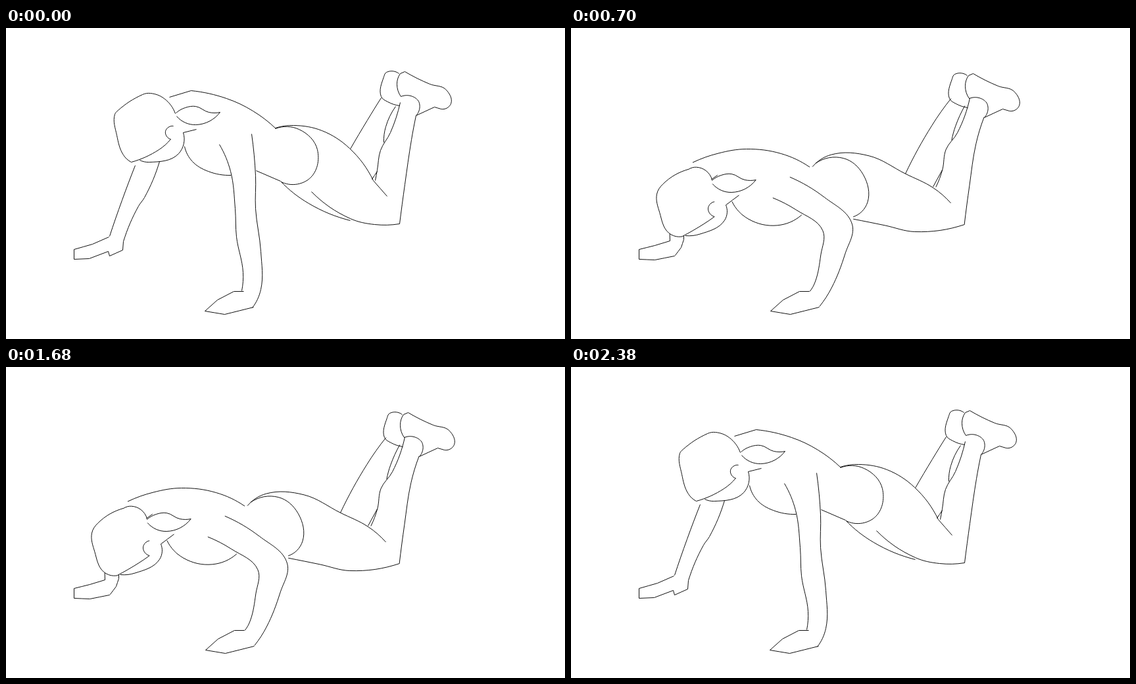
Recreate the animation shown at these times as an HTML page with a canvas. Size 850 by 474 pixels, loop 2520 ms.

```html
<!DOCTYPE html>
<html lang="en">
<head>
<meta charset="utf-8">
<title>Knee push-up</title>
<style>
html, body { margin: 0; width: 100%; height: 100%; overflow: hidden; background: #fff; }
canvas { display: block; }
</style>
</head>
<body>
<canvas id="stage" width="850" height="474"></canvas>
<script>
const ctx = document.getElementById('stage').getContext('2d');
const STEP = 140, STEPS = 18;
const NUM = /[\d.]+/g;
// Depth of the push-up at each named pose.
const AT = { up: 0, lift: 1, mid: 2, bend: 3, low: 4, late: 5, dip: 6, floor: 7 };

function shift(path, dx, dy) {
  let i = 0;
  return path.replace(NUM, n => +n + (i++ % 2 ? dy : dx));
}

function mix(a, b, t) {
  const to = b.match(NUM);
  let i = 0;
  return a.replace(NUM, n => (+n + (to[i++] - n) * t).toFixed(2));
}

// A part maps poses to a path: "x y x y", smooth except at "/" corners.
const slide = (path, moves) =>
  Object.fromEntries(Object.entries(moves).map(([k, [dx, dy]]) => [k, shift(path, dx, dy)]));
const keepLate = part => ({ ...part, late: part.low });
const fromDip = path => ({ dip: shift(path, 4, -16), floor: path });

const feet = path => slide(path, {
  up: [0, 0], lift: [1, -2], mid: [4, 2], bend: [4, 3], low: [4, 3], late: [5, 3], floor: [5, 3]
});

const farArmOuter = keepLate({
  up: '196 209 176 262 157 317',
  mid: '165 215 160 267 155 319',
  low: '147 273 149 298 150 324'
});
const farArmInner = keepLate({
  up: '233 203 210 258 201 271 178 325',
  mid: '197 230 191 262 187 272 177 319',
  low: '174 290 171 305 171 313 171 322'
});
const farHandUp = '156 318/131 329/103 337/103 352/126 351/155 340/157 347/177 338/178 325';
const farHand = keepLate({
  up: farHandUp,
  mid: farHandUp,
  low: '150 324/127 331/103 337/103 352/127 353/157 347/158 346/167 334/171 322'
});

const head = {
  up: '257 130 240 107 219 99 207 101/170 125 165 131 168 163 178 193 190 204/232 185 250 169/242 157 254 149',
  low: '220 205 211 190 197 184 187 187/143 211 138 218 142 250 152 282 165 291/206 272 223 261/214 248 223 237',
  floor: '202 282 192 271 176 267 162 270 132 290 114 322 119 343 140 371 175 370/190 352 207 339/196 328 207 319'
};
const jaw = {
  up: '203 201 217 204 262 191 269 159/289 154',
  low: '173 289 197 288 237 270 240 245/260 230',
  floor: '174 370 192 365 225 338 225 318/245 303'
};
const ponytail = slide('258 129 272 121 288 119 308 128 325 128/288 147 259 134', {
  up: [0, 0], mid: [-9, 28], low: [-38, 77], floor: [-57, 155]
});
const hairTie = { low: '219 205/229 199', floor: '200 282/209 273' };

const backFloor = '205 228 237 225 266 221 312 226 347 241';
const back = {
  up: '248 105/281 95/335 107 375 126 410 153',
  mid: '228 130/267 118/325 128 366 146 398 171',
  low: '160 197 206 172 262 163 322 172 374 198',
  ...fromDip(backFloor)
};
const elbow = fromDip('142 287 129 237 145 207 175 213 205 228');
const crook = fromDip('147 242 172 259 208 274');
const crease = fromDip('166 254/165 269');
const armpit = fromDip('347 315/361 313');
const chest = {
  up: '271 180 283 203 307 218 342 224',
  mid: '257 197 282 228 317 243 351 239',
  low: '247 243 270 271 315 282 352 269',
  floor: '239 306 268 330 310 337 347 315'
};

const armInner = {
  up: '324 177 341 218 348 275 350 318 360 372 358 400',
  mid: '324 177 350 235 370 287 371 340 367 385 362 401',
  low: '324 244 350 266 382 303 379 345 370 388 362 401',
  floor: '271 287 327 299 383 319/380 346 372 384 364 401'
};
const armOuter = {
  up: '373 161 379 225 379 275 387 340 387 398 374 426',
  mid: '362 170 395 243 409 290 402 352 392 400 377 424',
  low: '346 211 390 251 425 295 416 342 395 396 377 424',
  floor: '305 258 375 271 431 306 417 347 397 395 378 424'
};
const hand = slide('361 401/346 401/321 414/302 431/332 436/376 425', {
  up: [0, 0], low: [0, 0], late: [1, 0], floor: [1, 0]
});

const hip = {
  up: '409 153 445 154 473 185 461 229 418 234',
  low: '375 195 418 187 448 211 454 254 428 277',
  floor: '365 227 405 220 435 246 443 288 430 308'
};
const thigh = {
  up: '409 152 437 148 480 156 522 183 558 232/579 256',
  low: '374 196 400 183 455 185 512 216 553 242 578 266',
  floor: '352 241 385 212 448 213/500 233 546 246 575 267'
};
const seat = {
  up: '380 217/417 233/460 267 523 293',
  mid: '394 240/430 255/455 274 488 284',
  low: '414 277/428 278/460 286 490 297'
};
const underside = {
  up: '464 249 523 290 560 299 598 298',
  mid: '456 262 503 292 545 304 598 299',
  low: '428 278 475 292 527 305 598 299',
  floor: '430 316 480 317 513 320 598 299'
};
const shinLow = '598 299/606 240 616 176 628 135';
const shin = {
  up: '598 298/606 238 616 170 623 133',
  mid: shinLow,
  low: shinLow,
  floor: '597 298/604 241 614 176 627 136'
};
const calf = {
  up: '599 113 584 159 569 186 564 216 561 232',
  low: '606 106 587 158 570 183 564 217 554 242',
  floor: '606 107 587 162 569 188 565 212 555 242'
};
const gap = { up: '564 218/556 230', low: '564 217/551 241', floor: '565 212/548 243' };
const farLeg = {
  up: '570 106 549 140 523 184',
  mid: '576 106 553 143 518 194',
  low: '578 108 550 146 512 216',
  floor: '576 105 545 152 500 233'
};
const farCalf = {
  up: '592 119 577 150 574 174',
  low: '599 118 586 148 579 170',
  floor: '597 118 581 150 577 172'
};
const farShoe = feet('598 118 580 112 570 104 574 74 578 67 597 69');
const shoe = feet('600 104 594 85 599 69/606 66/644 85 668 93 676 115 661 123/651 120/623 133/628 114 618 104 600 104');

const behind = [farArmOuter, farArmInner, farHand];
const front = [
  jaw, ponytail, hairTie, back, elbow, crook, crease, armpit, chest, armInner, armOuter, hand,
  hip, thigh, seat, underside, shin, calf, gap, farLeg, farCalf, farShoe, shoe
];

function pathAt(part, p) {
  const keys = Object.keys(part), last = keys.length - 1, end = AT[keys[last]];
  if (p < AT[keys[0]] || (p > end && end < AT.floor)) return null;
  let i = 0;
  while (i < last - 1 && p >= AT[keys[i + 1]]) i++;
  const a = AT[keys[i]], b = AT[keys[i + 1]];
  if (p === b) return part[keys[i + 1]];
  let t = (p - a) / (b - a);
  if (a === AT.up && b === AT.low) t **= 1.5; // slow start
  return mix(part[keys[i]], part[keys[i + 1]], t);
}

const unit = (x, y) => {
  const d = Math.hypot(x, y) || 1;
  return [x / d, y / d];
};

// Directions at each point: bisected inside, mirrored across the chord at the ends.
function headings(pts) {
  const chords = pts.slice(1).map(([x, y], i) => unit(x - pts[i][0], y - pts[i][1]));
  const n = chords.length;
  if (n === 1) return [chords[0], chords[0]];
  const mirror = (v, c) => {
    const d = 2 * (v[0] * c[0] + v[1] * c[1]);
    return [d * c[0] - v[0], d * c[1] - v[1]];
  };
  const inner = chords.slice(1).map((c, i) => unit(c[0] + chords[i][0], c[1] + chords[i][1]));
  return [mirror(inner[0], chords[0]), ...inner, mirror(inner[n - 2], chords[n - 1])];
}

function curve(pts) {
  const dirs = headings(pts);
  for (let i = 0; i < pts.length - 1; i++) {
    const [x0, y0] = pts[i], [x1, y1] = pts[i + 1], u = dirs[i], v = dirs[i + 1];
    const h = Math.hypot(x1 - x0, y1 - y0) * 0.35;
    ctx.bezierCurveTo(x0 + u[0] * h, y0 + u[1] * h, x1 - v[0] * h, y1 - v[1] * h, x1, y1);
  }
}

function drawPart(part, p, filled) {
  const path = pathAt(part, p);
  if (!path) return;
  let tail = null;
  ctx.beginPath();
  for (const run of path.split('/')) {
    const n = run.match(NUM).map(Number), pts = tail ? [tail] : [];
    for (let i = 0; i < n.length; i += 2) pts.push([n[i], n[i + 1]]);
    if (!tail) ctx.moveTo(...pts[0]);
    if (pts.length > 1) curve(pts);
    tail = pts[pts.length - 1];
  }
  if (filled) ctx.fill();
  ctx.stroke();
}

function draw(p) {
  ctx.setTransform(1, 0, 0, 1, 0, 0);
  ctx.fillStyle = '#fff';
  ctx.fillRect(0, 0, 850, 474);
  ctx.translate(0.5, 0.5);
  ctx.strokeStyle = '#111';
  behind.forEach(part => drawPart(part, p));
  drawPart(head, p, true);
  front.forEach(part => drawPart(part, p));
}

let start = null, shown = -1;
function tick(now) {
  if (start === null) start = now;
  const step = Math.floor((now - start) / STEP) % STEPS;
  const depth = Math.min(step, STEPS - 1 - step);
  // The lowest pose slows down, so it sinks only a little further.
  if (depth !== shown) draw(Math.min(shown = depth, 7.3));
  requestAnimationFrame(tick);
}
draw(0);
requestAnimationFrame(tick);
</script>
</body>
</html>
```
